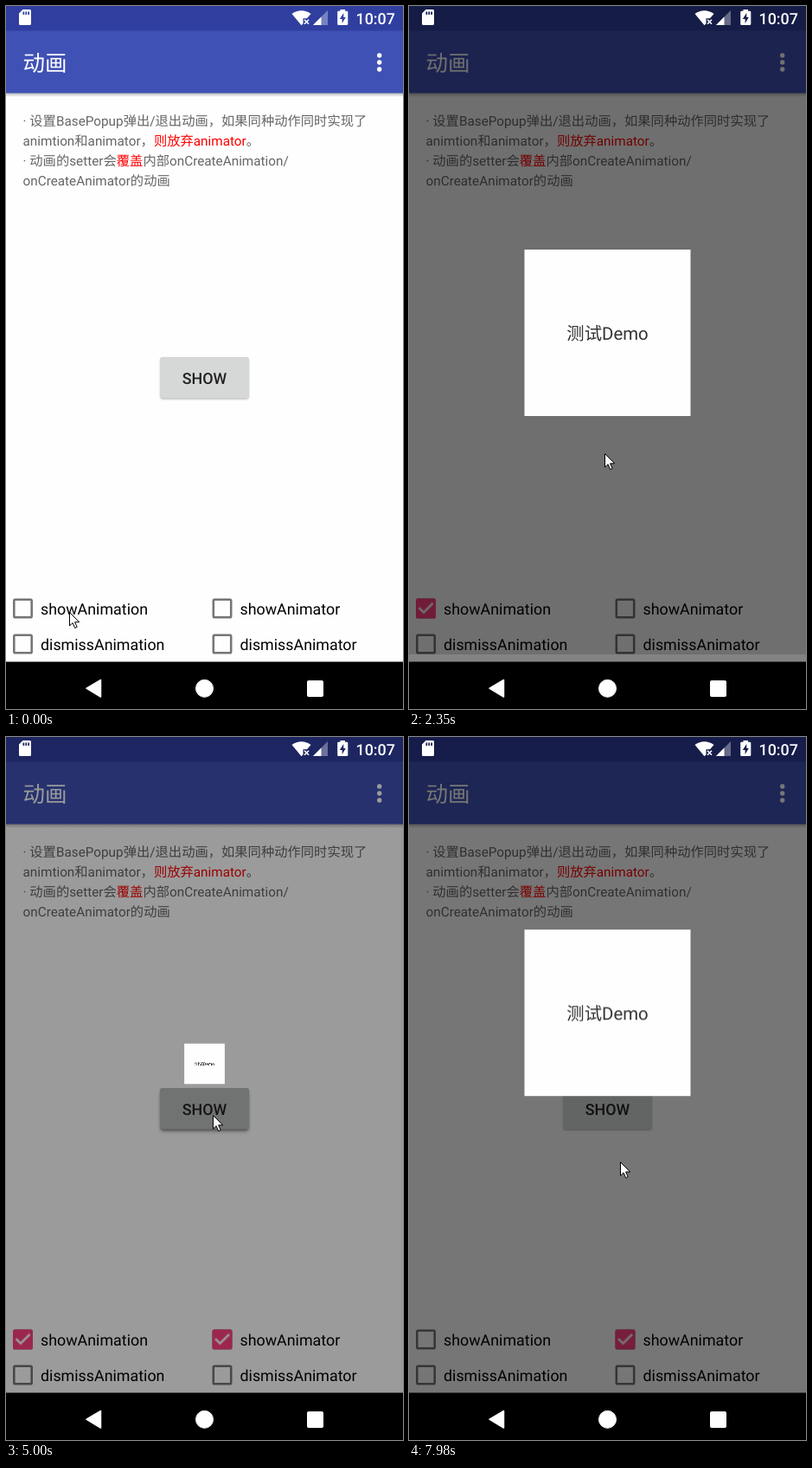
An HTML page that plays this animation: 459 px wide and 811 px high, repeating every 8000 ms.

```html
<!DOCTYPE html>
<html lang="zh-CN">
<head>
<meta charset="utf-8">
<title>动画</title>
<style>
html, body { margin: 0; width: 100%; height: 100%; overflow: hidden; background: #fefefe; }
svg { display: block; width: 459px; height: 811px; font-family: Roboto, 'Noto Sans CJK SC', 'Noto Sans CJK', sans-serif; text-rendering: geometricPrecision; }
.note { font-size: 15.3px; fill: #666; }
.note .hot { fill: #f00; }
.label { font-size: 17.85px; fill: #000; }
.bold { font-size: 17.85px; font-weight: 500; }

#cursor, #dim, #strip, #popup, .press, .tick, .ripple { animation: 8s linear infinite; }
#popup, .ripple { transform-box: fill-box; transform-origin: center; }

#cursor { animation-name: cursor; animation-timing-function: ease-in-out; }
@keyframes cursor {
  0%, 11.625% { transform: translate(73px, 699px); }
  19.75% { transform: translate(238px, 437px); }
  20.125%, 24.5% { transform: translate(240px, 434px); }
  29.375%, 39.125% { transform: translate(226px, 516px); }
  44.375% { transform: translate(290px, 712px); }
  49% { transform: translate(260px, 698px); }
  49.75%, 53.75% { transform: translate(255px, 695px); }
  57.375%, 59.625% { transform: translate(240px, 432px); }
  60.5%, 62.5% { transform: translate(239px, 436px); }
  65.625%, 72.125% { transform: translate(235px, 527px); }
  76.125%, 82.5% { transform: translate(60px, 692px); }
  87.75%, 95.5% { transform: translate(242px, 439px); }
  99.75%, 100% { transform: translate(244px, 490px); }
}

/* decelerating fade in, instant removal */
#dim { animation-name: dim; animation-timing-function: cubic-bezier(.333, .667, .667, 1); }
@keyframes dim {
  0%, 22.925% { opacity: 0; }
  28.175%, 36.87% { opacity: .56; }
  36.875%, 60.125% { opacity: 0; }
  65.375%, 70.995% { opacity: .56; }
  71%, 90.525% { opacity: 0; }
  95.775%, 100% { opacity: .535; }
}

#strip { opacity: 0; animation-name: strip; animation-timing-function: step-end; }
@keyframes strip {
  0% { opacity: 0; }
  27.5% { opacity: .14; }
  36.875%, 100% { opacity: 0; }
}

/* two scale-ins, then a slide up that overshoots */
#popup { animation-name: popup; animation-timing-function: cubic-bezier(.364, 0, .636, 1); }
@keyframes popup {
  0%, 23.9375% { transform: translateY(0) scale(0); }
  28.4375%, 36.87% { transform: translateY(0) scale(1); }
  36.875%, 61.0375% { transform: translateY(0) scale(0); }
  65.5375%, 70.995% { transform: translateY(0) scale(1); }
  71%, 91.43% { transform: translateY(0) scale(0); }
  91.4375% { transform: translateY(144px) scale(1); animation-timing-function: cubic-bezier(.3333, 1.493, .6667, 1.281); }
  100% { transform: translateY(-54.2px) scale(1); }
}

.press { animation-name: press; }
@keyframes press {
  0%, 22% { opacity: 0; }
  23.5%, 25.5% { opacity: 1; }
  29%, 59.625% { opacity: 0; }
  61%, 63% { opacity: 1; }
  66%, 89.625% { opacity: 0; }
  91%, 92.5% { opacity: 1; }
  95.5%, 100% { opacity: 0; }
}

#tick1 { animation-name: tick1; }
@keyframes tick1 {
  0%, 9.75% { opacity: 0; }
  11.25%, 79.875% { opacity: 1; }
  81.375%, 100% { opacity: 0; }
}
#tick2 { animation-name: tick2; }
@keyframes tick2 {
  0%, 51.875% { opacity: 0; }
  53.375%, 100% { opacity: 1; }
}

.ripple { fill: #ff4081; animation-name: ripple; }
#ripple1 { animation-delay: -7.22s; }
#ripple2 { animation-delay: -3.85s; }
@keyframes ripple {
  0% { opacity: .2; transform: scale(.3); }
  2.5% { opacity: .2; transform: scale(1); }
  5.25%, 100% { opacity: 0; transform: scale(1); }
}
</style>
</head>
<body>
<svg viewBox="0 0 459 811">
  <defs>
    <linearGradient id="fade" x2="0" y2="1">
      <stop stop-color="#000" stop-opacity=".3"/>
      <stop offset="1" stop-color="#000" stop-opacity="0"/>
    </linearGradient>
    <filter id="soft" x="-10%" y="-25%" width="120%" height="150%"><feGaussianBlur stdDeviation="1.3"/></filter>
    <filter id="softer" x="-10%" y="-25%" width="120%" height="150%"><feGaussianBlur stdDeviation="2.2"/></filter>
    <g id="box" transform="scale(1.275) translate(-12 -12)">
      <rect x="4" y="4" width="16" height="16" rx="1" fill="none" stroke="#757575" stroke-width="2"/>
    </g>
    <g id="checked" transform="scale(1.275) translate(-12 -12)">
      <rect x="3" y="3" width="18" height="18" rx="2" fill="#ff4081"/>
      <path d="M10 17l-5-5 1.41-1.41L10 14.17l7.59-7.59L19 8z" fill="#fefefe"/>
    </g>
  </defs>

  <rect width="459" height="811" fill="#fefefe"/>

  <!-- app bar -->
  <rect y="100" width="459" height="5" fill="url(#fade)"/>
  <rect width="459" height="100.5" fill="#3f51b5"/>
  <rect width="459" height="28.5" fill="#303f9f"/>
  <text x="19.5" y="75" font-size="25.5" fill="#fff">动画</text>
  <g fill="#fff">
    <circle cx="431.7" cy="57" r="2.7"/>
    <circle cx="431.7" cy="65" r="2.7"/>
    <circle cx="431.7" cy="73" r="2.7"/>
  </g>

  <g class="note">
    <text x="19.5" y="138">· 设置BasePopup弹出/退出动画，如果同种动作同时实现了</text>
    <text x="19.5" y="161">animtion和animator，<tspan class="hot">则放弃animator</tspan>。</text>
    <text x="19.5" y="184">· 动画的setter会<tspan class="hot">覆盖</tspan>内部onCreateAnimation/</text>
    <text x="19.5" y="207">onCreateAnimator的动画</text>
  </g>

  <!-- button -->
  <rect x="178.5" y="406.5" width="102" height="47" rx="2.5" opacity=".3" filter="url(#soft)"/>
  <g class="press"><rect x="179" y="409" width="101" height="46" rx="3" opacity=".35" filter="url(#softer)"/></g>
  <rect x="178" y="405" width="103" height="47.5" rx="2.5" fill="#d6d7d7"/>
  <rect class="press" x="178" y="405" width="103" height="47.5" rx="2.5" fill-opacity=".13"/>
  <text class="bold" x="229.5" y="435.5" text-anchor="middle" fill="#212121">SHOW</text>

  <!-- options -->
  <circle class="ripple" id="ripple1" cx="19.5" cy="695" r="25"/>
  <circle class="ripple" id="ripple2" cx="250" cy="695" r="25"/>
  <use href="#box" x="19.5" y="695"/>
  <use href="#box" x="250" y="695"/>
  <use href="#box" x="19.5" y="736"/>
  <use href="#box" x="250" y="736"/>
  <use class="tick" id="tick1" href="#checked" x="19.5" y="695"/>
  <use class="tick" id="tick2" href="#checked" x="250" y="695"/>
  <g class="label">
    <text x="40" y="702">showAnimation</text>
    <text x="270.5" y="702">showAnimator</text>
    <text x="40" y="743">dismissAnimation</text>
    <text x="270.5" y="743">dismissAnimator</text>
  </g>

  <rect id="dim" width="459" height="757"/>
  <rect id="strip" y="748" width="459" height="9" fill="#fff"/>

  <!-- status icons -->
  <g fill="#fff">
    <path fill-rule="evenodd" d="M19.5 4H27.5Q29 4 29 5.5V20.5Q29 22 27.5 22H16.5Q15 22 15 20.5V8.5zM19.5 6.5V10H21.2V6.5zM22.4 6.5V10H24.1V6.5zM25.3 6.5V10H27V6.5z"/>
    <path d="M330.5 9Q341.5 1.5 352.5 9L348 14.2H343.5V20.2L341.5 22.3z"/>
    <path d="M345 15.8l5 5m0-5l-5 5" fill="none" stroke="#fff" stroke-width="1.6"/>
    <path d="M372 5V22H355z" opacity=".35"/>
    <path d="M364.5 12.5V22H355z"/>
    <path fill-rule="evenodd" d="M386.5 5.7V4H392V5.7H394Q395.3 5.7 395.3 7V20.7Q395.3 22 394 22H384.5Q383.2 22 383.2 20.7V7Q383.2 5.7 384.5 5.7zM390.3 8L385.8 15H388.6V20L392.8 13H390.3z"/>
    <text class="bold" x="404.5" y="20.5">10:07</text>
  </g>

  <g id="popup">
    <rect x="133.5" y="281" width="192" height="192" fill="#fefefe"/>
    <text x="229.5" y="385" font-size="20.4" text-anchor="middle" fill="#333">测试Demo</text>
  </g>

  <!-- navigation bar -->
  <rect y="756.5" width="459" height="55"/>
  <g fill="#fff" stroke="#fff" stroke-linejoin="round">
    <path d="M93 787.2L109.5 777.5V797z" stroke-width="1.5"/>
    <circle cx="229.5" cy="787.3" r="10"/>
    <rect x="348.5" y="778.5" width="18" height="18" rx="1"/>
  </g>

  <g id="cursor">
    <path d="M.5 .5V16L4.1 12.7 6.7 18.6 9.2 17.5 6.6 11.8H11.7z" fill="#fff" stroke="#000"/>
  </g>
</svg>
</body>
</html>
```
